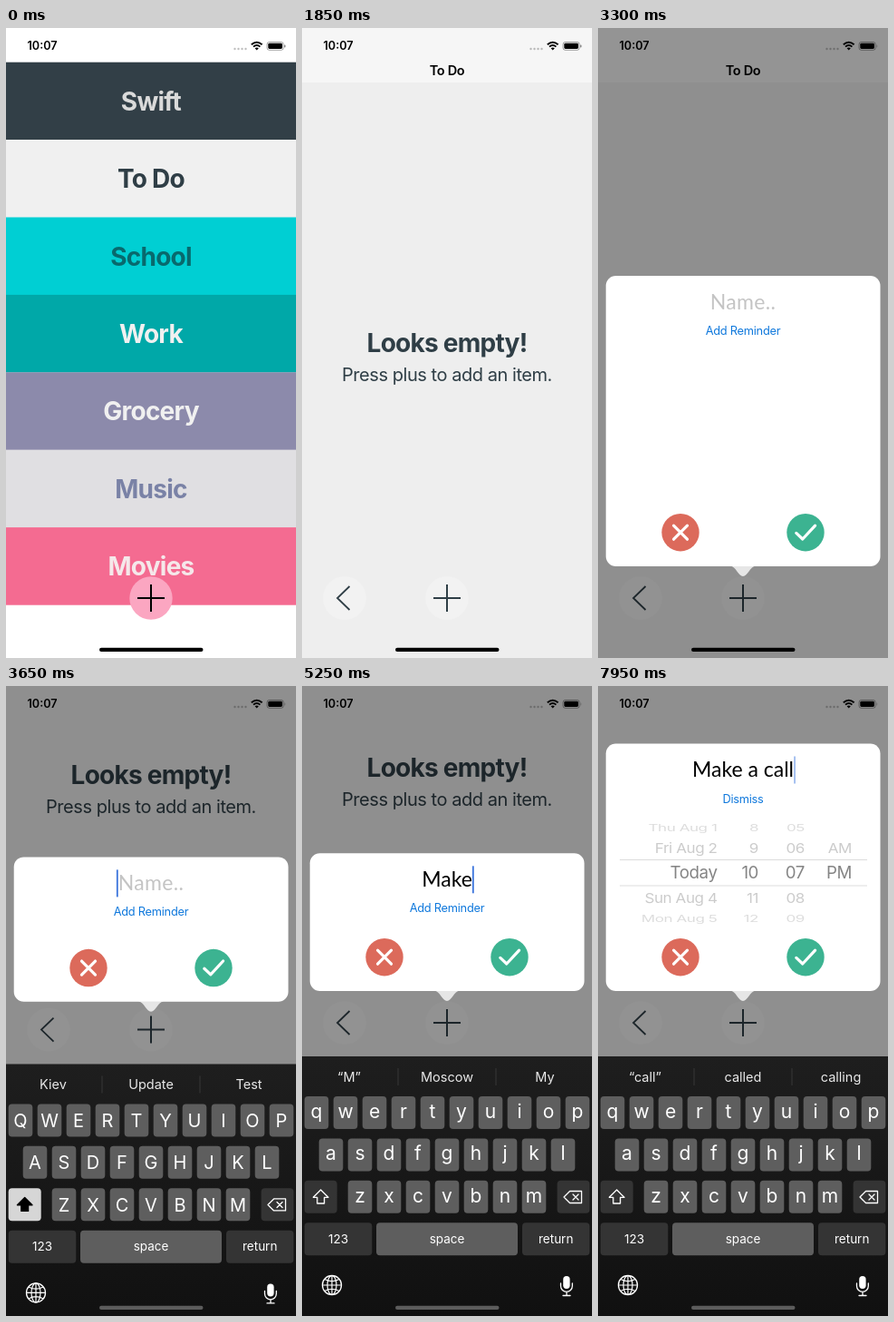
These frames come from a looping animation (320x694 px, 8 s). An HTML page:

```html
<!DOCTYPE html>
<html lang="en">
<head>
<meta charset="utf-8">
<title>To-do list</title>
<style>
html, body { margin: 0; width: 100%; height: 100%; overflow: hidden; background: #fff; }
svg { display: block; width: 100vw; height: 100vh; font-family: Inter, Roboto, sans-serif; }
text { white-space: pre; }
</style>
</head>
<body>
<svg id="stage" viewBox="0 0 320 694"></svg>
<script>
const LOOP = 8000;
const stage = document.getElementById('stage');

function add(parent, tag, attrs = {}) {
  const node = document.createElementNS('http://www.w3.org/2000/svg', tag);
  for (const k in attrs) node.setAttribute(k, attrs[k]);
  parent.appendChild(node);
  return node;
}
const group = (parent, attrs) => add(parent, 'g', attrs);
const box = (parent, x, y, width, height, fill, rx = 0) =>
  add(parent, 'rect', { x, y, width, height, fill, rx });
const line = (parent, d, stroke, width, extra = {}) =>
  add(parent, 'path', { d, stroke, 'stroke-width': width, fill: 'none', ...extra });
const round = { 'stroke-linecap': 'round', 'stroke-linejoin': 'round' };
function label(parent, str, x, y, size, fill, extra = {}) {
  const node = add(parent, 'text', { x, y, fill, 'font-size': size, 'text-anchor': 'middle', ...extra });
  node.textContent = str;
  return node;
}
const set = (node, k, v) => node.setAttribute(k, v);
const move = (node, y) => set(node, 'transform', `translate(0 ${y})`);
const show = (node, a) => set(node, 'opacity', a);
const write = (node, str) => { if (node.textContent !== str) node.textContent = str; };

const clamp = v => Math.min(1, Math.max(0, v));
const ramp = (t, a, b) => clamp((t - a) / (b - a));
const smooth = v => v * v * (3 - 2 * v);
const easeOut = v => 1 - (1 - v) ** 3;
const mix = (a, b, p) => a + (b - a) * p;
const spring = (ms, w) => {
  const x = Math.max(0, ms) / 1000 * w;
  return 1 - (1 + x) * Math.exp(-x);
};

// Category list
const ROW = 85.4, TOP = 37.7, INK = '#2f3e46';
const bold = { 'font-weight': 700, 'letter-spacing': -0.75 };
const rows = [
  ['Swift', '#323f47', '#dadada'],
  ['To Do', '#f0f0f0', INK],
  ['School', '#00cfd3', '#08696d'],
  ['Work', '#00a8a8', '#f0f0f0'],
  ['Grocery', '#8c8aab', '#f0f0f0'],
  ['Music', '#e0dfe2', '#7a82a6'],
  ['Movies', '#f46b91', '#f5e8ea']
];
function makeRow(parent, [name, fill, ink], i) {
  const g = group(parent), y = TOP + ROW * i;
  box(g, 0, y, 320, ROW + 0.2, fill);
  label(g, name, 160, y + 53, 28, ink, bold);
  return g;
}
box(stage, 0, 0, 320, 694, '#fff');
const list = group(stage);
rows.forEach((r, i) => makeRow(list, r, i));
const ghost = group(stage);
const ghostRows = rows.map((r, i) => makeRow(ghost, r, i));

const plusPath = 'M145 628H175M160 613V643';
const addButton = group(stage);
add(addButton, 'circle', { cx: 160, cy: 628, r: 23.7, fill: '#fba6c1' });
line(addButton, plusPath, '#000', 2);

// Detail page
const page = group(stage);
box(page, 0, 0, 320, 694, '#eee');
const content = group(page);
box(content, 0, 0, 320, 60, '#f6f6f6');
label(content, 'To Do', 160, 51.5, 14.5, '#000', { 'font-weight': 600, 'letter-spacing': -0.3 });
const empty = group(content);
label(empty, 'Looks empty!', 160, 357, 28, INK, bold);
label(empty, 'Press plus to add an item.', 160, 389, 20, INK, { 'letter-spacing': -0.45 });
for (const cx of [47, 160])
  add(empty, 'circle', { cx, cy: 628, r: 24, fill: '#fff', opacity: 0.2 });
line(empty, 'M52.5 615L39 628L52.5 641', INK, 1.8);
line(empty, plusPath, INK, 2);
const dim = box(stage, 0, 0, 320, 694, '#000');

// Keyboard, drawn from its own top edge
const defs = add(stage, 'defs');
const shade = add(defs, 'linearGradient', { id: 'shade', x1: 0, y1: 0, x2: 0, y2: 1 });
add(shade, 'stop', { offset: 0, 'stop-color': '#1e1e1e' });
add(shade, 'stop', { offset: 1, 'stop-color': '#101010' });

const keyboard = group(stage);
box(keyboard, 0, 0, 320, 290, 'url(#shade)');
for (const x of [106, 214]) box(keyboard, x - 0.5, 13, 1, 19, '#383838');
const hints = [52, 160, 268].map(x => label(keyboard, '', x, 27.5, 14.5, '#e8e8e8'));
const KEY = '#5e5e5e', SIDE = '#343434', H = 36;
const letters = [];
[['qwertyuiop', 2.7, 44], ['asdfghjkl', 18.7, 90.4], ['zxcvbnm', 50.7, 136.8]].forEach(([set, x0, y]) =>
  [...set].forEach((ch, i) => {
    const x = x0 + 32 * i;
    box(keyboard, x, y, 26.6, H, KEY, 4);
    letters.push({ ch, y, node: label(keyboard, ch, x + 13.3, y + 24, 21, '#fff') });
  }));
const shiftKey = box(keyboard, 2.7, 136.8, 36, H, SIDE, 4);
const shiftArrow = line(keyboard, 'M20.7 147L29 155.3H24.6V162H16.8V155.3H12.4Z', '#fff', 1.3, { 'stroke-linejoin': 'round' });
box(keyboard, 281.6, 136.8, 35.8, H, SIDE, 4);
line(keyboard, 'M289 155L295.5 148.5H308.5V161.5H295.5ZM299 152L305 158M305 152L299 158', '#fff', 1.3, round);
[[2.7, 74.6, SIDE, '123'], [82, 156, KEY, 'space'], [243, 74.4, SIDE, 'return']].forEach(([x, w, fill, name]) => {
  box(keyboard, x, 183.2, w, H, fill, 4);
  label(keyboard, name, x + w / 2, 206, 13.5, '#fff');
});
add(keyboard, 'circle', { cx: 33, cy: 252, r: 10.5, stroke: '#fff', 'stroke-width': 1.3, fill: 'none' });
add(keyboard, 'ellipse', { cx: 33, cy: 252, rx: 5, ry: 10.5, stroke: '#fff', 'stroke-width': 1.2, fill: 'none' });
line(keyboard, 'M22.5 252H43.5M33 241.5V262.5M25 245.5Q33 250 41 245.5M25 258.5Q33 254 41 258.5', '#fff', 1.2);
box(keyboard, 288.2, 242, 7.4, 14, '#fff', 3.7);
line(keyboard, 'M285.5 250V253A6.4 6.4 0 0 0 298.3 253V250M292 259.5V263.5M288 263.5H296', '#fff', 1.3, round);

// Pop-up card
const card = group(stage);
const foot = group(card);
add(foot, 'path', { d: 'M146 -0.5H174C168 0 165 11 160 11C155 11 152 0 146 -0.5Z', fill: '#e6e6e6' });
const panel = box(card, 8.7, 0, 302.8, 0, '#fff', 11);
const buttons = group(card);
add(buttons, 'circle', { cx: 91, cy: -37.3, r: 20.7, fill: '#dc6a5b' });
line(buttons, 'M83.5 -44.8L98.5 -29.8M98.5 -44.8L83.5 -29.8', '#fff', 3.2, round);
add(buttons, 'circle', { cx: 229, cy: -37.3, r: 20.7, fill: '#3cb391' });
line(buttons, 'M218.8 -36.6L225.8 -30L239.6 -44.8', '#fff', 3.2, round);
const head = group(card);
const lato = { 'font-family': 'Lato, "Open Sans", sans-serif' };
const holder = label(head, 'Name..', 160, 36.5, 23, '#c4c4c4', { ...lato, 'letter-spacing': 0.3 });
const field = label(head, '', 160, 36.5, 23, '#000', lato);
const caret = box(head, 0, 14, 1.8, 30, '#3a74dc');
const link = label(head, '', 160, 65, 12.8, '#0f78dc', { 'letter-spacing': -0.25 });

// Date wheel
const wheel = group(head);
for (const y of [127.5, 156]) box(wheel, 24, y, 273, 1, '#bbb');
[
  ['Thu Aug 1', '8', '05', '', 92, 0.6, '#bbb'],
  ['Fri Aug 2', '9', '06', 'AM', 114.5, 0.88, '#999'],
  ['Today', '10', '07', 'PM', 142, 1, '#0c0c0c'],
  ['Sun Aug 4', '11', '08', '', 169.5, 0.88, '#999'],
  ['Mon Aug 5', '12', '09', '', 192, 0.6, '#bbb']
].forEach(([day, hour, minute, half, y, squash, ink]) => {
  const g = group(wheel, { transform: `translate(0 ${y}) scale(1 ${squash})` });
  const size = squash === 1 ? 18.7 : 17;
  [[day, 131.5], [hour, 177], [minute, 228], [half, 280]].forEach(([str, x]) =>
    label(g, str, x, 6.8, size, ink, { 'text-anchor': 'end', 'letter-spacing': -0.4 }));
});

// Status bar and home indicator
const status = group(stage);
label(status, '10:07', 40, 24.3, 12.6, '#000', { 'font-weight': 600 });
for (let i = 0; i < 4; i++)
  add(status, 'circle', { cx: 252.5 + i * 4, cy: 23, r: 1.2, fill: '#000', opacity: 0.25 });
line(status, 'M270.8 18.3Q276.7 13.2 282.6 18.3M273 20.6Q276.7 17.4 280.4 20.6', '#000', 1.9);
add(status, 'path', { d: 'M274.6 22.3Q276.7 20.6 278.8 22.3L276.7 24.6Z' });
add(status, 'rect', { x: 288, y: 15.5, width: 18.2, height: 8.8, rx: 2.5, fill: 'none', stroke: '#000', 'stroke-opacity': 0.4, 'stroke-width': 0.9 });
box(status, 289.3, 16.8, 15.6, 6.2, '#000', 1.4);
box(status, 307.2, 18.4, 1.2, 3, '#777', 0.6);
const homeBar = box(status, 103, 682.8, 114.5, 4.3, '#000', 2.15);

// Typing
const PHRASE = 'Make a call';
const strokes = [4600, 4800, 5000, 5150, 5450, 5600, 5750, 5900, 6050, 6150, 6300];
const predictions = [
  [0, 'Kiev', 'Update', 'Test'],
  [4700, '“M”', 'Moscow', 'My'],
  [5400, '“Make”', 'Makes', 'Maker'],
  [5600, 'sure', 'it', 'a'],
  [5850, 'few', 'lot', 'good'],
  [6050, '“c”', 'call', 'can'],
  [6400, '“call”', 'called', 'calling']
];

function drawKeyboard(t, rise) {
  move(keyboard, 694 - 286 * rise);
  const caps = t < strokes[0] + 50;
  for (const { ch, y, node } of letters) {
    write(node, caps ? ch.toUpperCase() : ch);
    set(node, 'font-size', caps ? 20 : 21);
    set(node, 'y', y + (caps ? 25.3 : 24));
  }
  set(shiftKey, 'fill', caps ? '#d6d6d6' : SIDE);
  set(shiftArrow, 'fill', caps ? '#000' : 'none');
  set(shiftArrow, 'stroke', caps ? '#000' : '#fff');
  const words = predictions.filter(p => t >= p[0]).pop();
  hints.forEach((node, i) => write(node, words[i + 1]));
}

function drawField(t) {
  const count = strokes.filter(s => t >= s).length;
  write(field, PHRASE.slice(0, count));
  show(holder, count ? 0 : 1);
  const edge = count
    ? 161 + field.getComputedTextLength() / 2
    : 159 - holder.getComputedTextLength() / 2;
  set(caret, 'x', edge - 0.9);
  const phase = (t - (count ? strokes[count - 1] : 3400)) % 1000;
  const blink = phase < 900 ? 1 - ramp(phase, 550, 750) : ramp(phase, 900, 1000);
  show(caret, t < 3400 ? 0 : blink);
}

function drawCard(t) {
  const pop = easeOut(ramp(t, 2600, 3150));
  const lift = spring(t - 3400, 19.3);
  const grow = smooth(ramp(t, 7400, 7850));
  const top = mix(mix(273, 184.3, lift), 63.5, grow);
  const bottom = mix(593, 336, lift);
  set(card, 'transform', `translate(160 604) scale(${pop}) translate(-160 -604)`);
  show(card, t < 2600 ? 0 : 1);
  set(panel, 'y', top);
  set(panel, 'height', bottom - top);
  move(head, top);
  move(foot, bottom);
  move(buttons, bottom);
  write(link, t < 7400 ? 'Add Reminder' : 'Dismiss');
  show(wheel, ramp(t, 7700, 8200));
}

function draw(t) {
  const open = smooth(ramp(t, 845, 1450));
  const pageTop = mix(TOP + ROW, 0, open);
  const pageEnd = mix(TOP + ROW * 2, 694, open);
  set(page, 'transform', `translate(0 ${pageTop}) scale(1 ${(pageEnd - pageTop) / 694})`);
  show(page, ramp(t, 845, 945));
  ghostRows.forEach((g, i) => move(g, i < 1 ? pageTop - TOP - ROW : i > 1 ? pageEnd - TOP - ROW * 2 : 0));
  show(ghost, t < 845 ? 0 : 1 - ramp(t, 845, 1072));
  show(addButton, 1 - ramp(t, 650, 850));
  show(empty, ramp(t, 1400, 1600));

  const rise = spring(t - 3400, 21.4);
  move(content, -257 * rise);
  show(dim, 0.4 * smooth(ramp(t, 2550, 3050)));
  drawKeyboard(t, rise);
  drawCard(t);
  drawField(t);
  set(homeBar, 'fill', rise > 0.05 ? '#5c5c5c' : '#000');
}

const start = performance.now();
function tick() {
  draw((performance.now() - start) % LOOP);
  requestAnimationFrame(tick);
}
tick();
</script>
</body>
</html>
```
